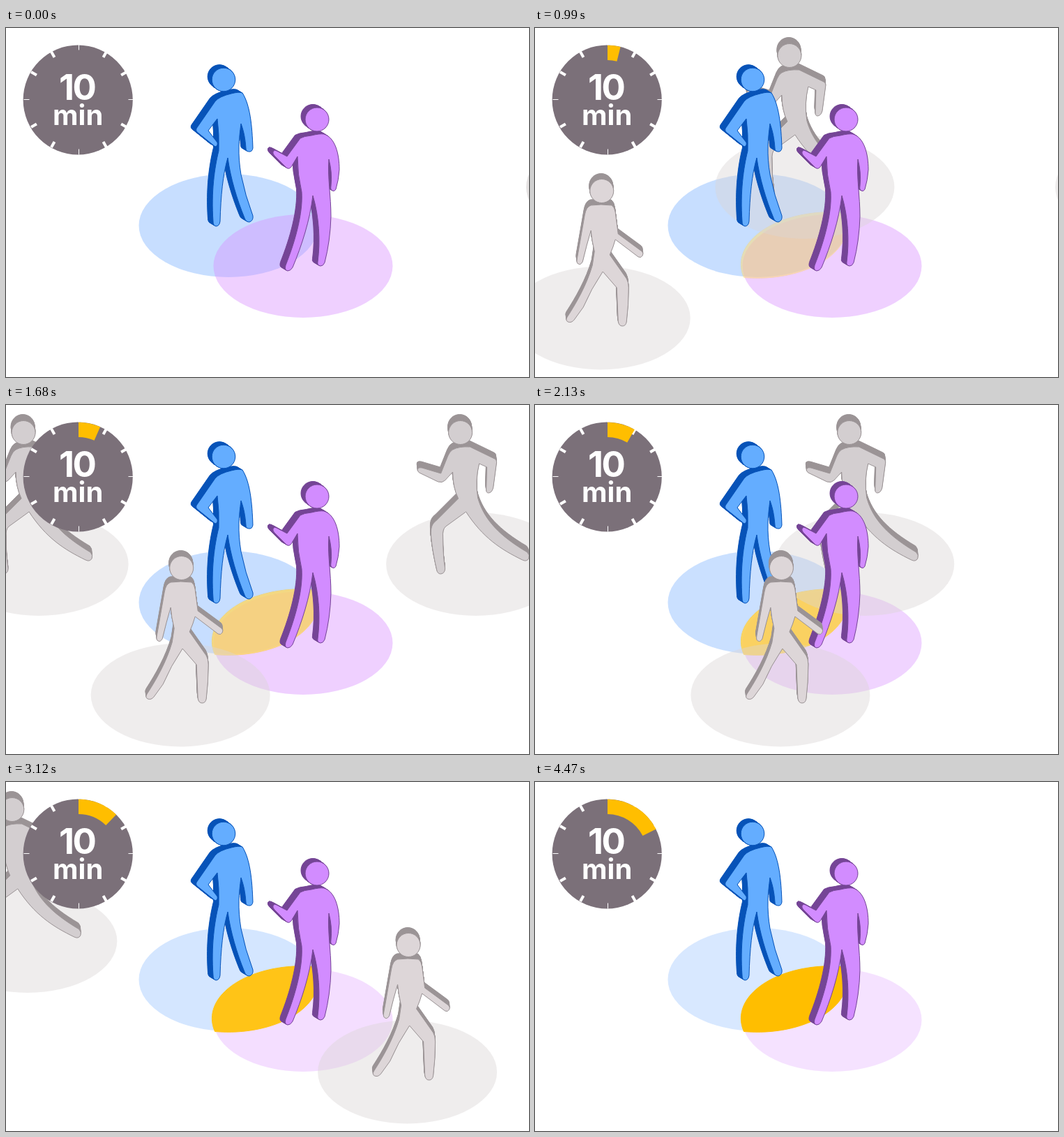
An HTML page for the animation above (7.57 s loop, 750 by 500 pixels).

```html
<!DOCTYPE html>
<html lang="en">
<head>
<meta charset="utf-8">
<title>Ten minutes</title>
<style>
  html, body { margin: 0; width: 100%; height: 100%; overflow: hidden; background: #fff; }
  svg { display: block; }
  text { font-family: Inter, "Liberation Sans", sans-serif; font-weight: 700; fill: #fff; text-anchor: middle; }
</style>
</head>
<body>
<svg id="stage" width="750" height="500" viewBox="0 0 750 500"></svg>
<script>
const STEP = 30, MOVE_END = 4470, LOOP = 7570;
const stage = document.getElementById('stage');

function add(parent, tag, attrs = {}) {
  const el = document.createElementNS('http://www.w3.org/2000/svg', tag);
  for (const key in attrs) el.setAttribute(key, attrs[key]);
  parent.appendChild(el);
  return el;
}

const floorSpot = (cx, cy, fill, opacity) =>
  add(stage, 'ellipse', { cx, cy, rx: 128.5, ry: 74, fill, 'fill-opacity': opacity });

// A flat shape with a solid side, made of shifted dark copies under the front face.
function extrude(parent, tag, shape, { light, dark }, [dx, dy]) {
  const steps = 9;
  for (let i = steps; i > 0; i--) {
    add(parent, tag, { ...shape, fill: dark, stroke: dark,
      transform: `translate(${dx * i / steps} ${dy * i / steps})` });
  }
  add(parent, tag, { ...shape, fill: light, stroke: dark, 'stroke-linejoin': 'round' });
}

function person({ head: [cx, cy, r], body, depth, headDepth = depth, ...look }) {
  const group = add(stage, 'g');
  extrude(group, 'path', { d: body }, look, depth);
  extrude(group, 'circle', { cx, cy, r }, look, headDepth);
  return group;
}

const GREY_DARK = '#9b9496', GREY_SPOT = '#d9d4d5', GREY_ALPHA = 0.42;

const blue = {
  light: '#64adff', dark: '#0753b8', depth: [-7.5, -4.5], headDepth: [-6, -4.5], head: [312, 74, 16.8],
  body: `M323 94Q334 91 339 93C350 110 353 140 354 172Q353 178 348 177Q344 177 344 172
    C343 158 341 148 337 137C334 160 332 180 337 210Q343 240 354 269Q355 276 349 278
    Q344 278 342 272C331 245 322 215 318 186C311 210 308 240 307 277Q306 284 301 284
    Q297 283 297 277C294 235 299 200 305 176Q306 152 303 130L290 147L303 164
    Q304 169 300 170L274 149Q272 147 273 144L300 105Q306 98 323 94Z`
};

const purple = {
  light: '#d28cff', dark: '#754596', depth: [-7.5, -4.5], headDepth: [-6, -4.5], head: [446, 131, 17],
  body: `M438 154Q450 151 456 152C472 157 478 180 478 203Q477 218 473 231Q471 235 468 233
    Q465 232 466 226Q468 207 463 188C461 215 466 240 466 270Q465 305 457 336
    Q455 341 451 341Q446 340 447 335C451 305 449 270 440 240C436 275 424 312 411 343
    Q408 348 404 348Q399 347 401 340C415 305 426 265 424 235Q418 210 418 184
    L409 199Q406 203 402 200L385 183Q382 180 383 177Q385 174 388 176L403 184
    L422 158Q427 155 438 154Z`
};

// Passers-by are drawn around x = 0, the middle of their floor spot.
const walker = {
  light: '#ddd6d8', dark: GREY_DARK, depth: [-1, -8], head: [1.5, 233.5, 17],
  body: `M-14 254Q0 252 16 254Q20 257 21 264L25 295L59 320Q62 323 60 326Q58 330 54 328
    L21 303Q18 314 13 325L37 359Q40 364 40 372Q40 397 37 421Q36 427 31 427
    Q26 427 25 420L23 372L3 349Q-14 374 -25 400L-38 418Q-42 423 -47 421
    Q-51 419 -48 414C-35 394 -20 368 -12 340L-9 320Q-13 304 -14 290Q-20 310 -26 335
    Q-29 340 -32 338Q-35 337 -34 331L-23 268Q-21 256 -14 254Z`
};

const runner = {
  light: '#d3ced0', dark: GREY_DARK, depth: [-1, -9], head: [-22, 39.5, 17],
  body: `M-33 64Q-24 59 -8 60L27 77Q30 78 30 82L25 119Q23 126 18 126Q15 126 15 121
    L16 89L5 84Q-1 108 3 133C12 165 35 188 74 211Q78 215 76 220Q73 225 67 222
    C36 207 10 190 -14 153L-43 174Q-48 178 -47 190Q-47 215 -44 234Q-44 241 -50 242
    Q-55 242 -56 236C-62 210 -65 188 -64 178Q-63 170 -57 166L-25 134
    Q-33 118 -33 96L-44 108Q-48 112 -54 110L-81 97Q-85 94 -83 91Q-81 89 -77 90
    L-50 98L-40 73Q-37 66 -33 64Z`
};

const blueSpot = floorSpot(319, 283, '#69a5ff', 0.37);
const purpleSpot = floorSpot(426, 341, '#d78aff', 0.4);

// The shared area bleaches to white while the yellow comes in.
const lens = { d: 'M443.5 264.5A129 75 0 0 0 299.5 357.5A129 75 0 0 0 443.5 264.5Z' };
const bleach = add(stage, 'path', { ...lens, fill: '#fff' });
const overlap = add(stage, 'path', { ...lens, fill: '#ffbe00', stroke: '#ffbe00' });

// Straight walks: start position and time, speed in px per ms.
const runs = [
  { x: 874.5, start: 0, speed: -0.4925, y: 228, look: runner },
  { x: 874.5, start: 1230, speed: -0.4464, y: 228, look: runner },
  { x: -129.5, start: 0, speed: 0.226, y: 415.5, look: walker }
];
for (const run of runs) run.spot = floorSpot(0, run.y, GREY_SPOT, GREY_ALPHA);
const [firstRunner, secondRunner, stroller] = runs;
firstRunner.figure = person(firstRunner.look);
secondRunner.figure = person(secondRunner.look);
person(blue);
person(purple);
stroller.figure = person(stroller.look);

const clock = add(stage, 'g', { transform: 'translate(103.2 103)' });
add(clock, 'circle', { r: 78.6, fill: '#7b7079' });
const ticks = add(clock, 'g', { transform: 'translate(1.3 -0.5)', stroke: '#fff' });
for (let hour = 0; hour < 12; hour++) {
  const cardinal = hour % 3 === 0;
  add(ticks, 'line', { y1: -79, y2: cardinal ? -71 : -70,
    'stroke-width': cardinal ? 1 : 4, transform: `rotate(${hour * 30})` });
}
const elapsed = add(clock, 'path', { fill: '#ffbe00' });
add(clock, 'text', { x: -1.5, y: -0.5, 'font-size': 51, 'letter-spacing': -2.5 }).textContent = '10';
add(clock, 'text', { x: 0, y: 35.5, 'font-size': 40 }).textContent = 'min';

function sector(degrees) {
  const a = degrees * Math.PI / 180, outer = 78.3, inner = 57;
  const at = r => `${Math.sin(a) * r + 0.5} ${-Math.cos(a) * r}`;
  return `M0.8 ${-outer}A${outer} ${outer} 0 0 1 ${at(outer)}L${at(inner)}A${inner} ${inner} 0 0 0 0.8 ${-inner}Z`;
}

const progress = (t, from, to) => Math.min(1, Math.max(0, (t - from) / (to - from)));

function render(now) {
  const t = Math.min(MOVE_END, Math.floor(now % LOOP / STEP) * STEP);
  for (const run of runs) {
    const x = run.x + run.speed * Math.max(0, t - run.start);
    run.spot.setAttribute('cx', x);
    run.figure.setAttribute('transform', `translate(${x} 0)`);
  }
  const fade = progress(t, 1800, 3480);
  blueSpot.setAttribute('fill-opacity', 0.37 - 0.11 * fade);
  purpleSpot.setAttribute('fill-opacity', 0.4 - 0.15 * fade);
  bleach.setAttribute('opacity', progress(t, 0, 2730));
  overlap.setAttribute('opacity', progress(t, 0, 3450));
  elapsed.setAttribute('d', t ? sector(63 * t / MOVE_END) : '');
}

const begin = performance.now();
function tick() {
  render(performance.now() - begin);
  requestAnimationFrame(tick);
}
tick();
</script>
</body>
</html>
```
